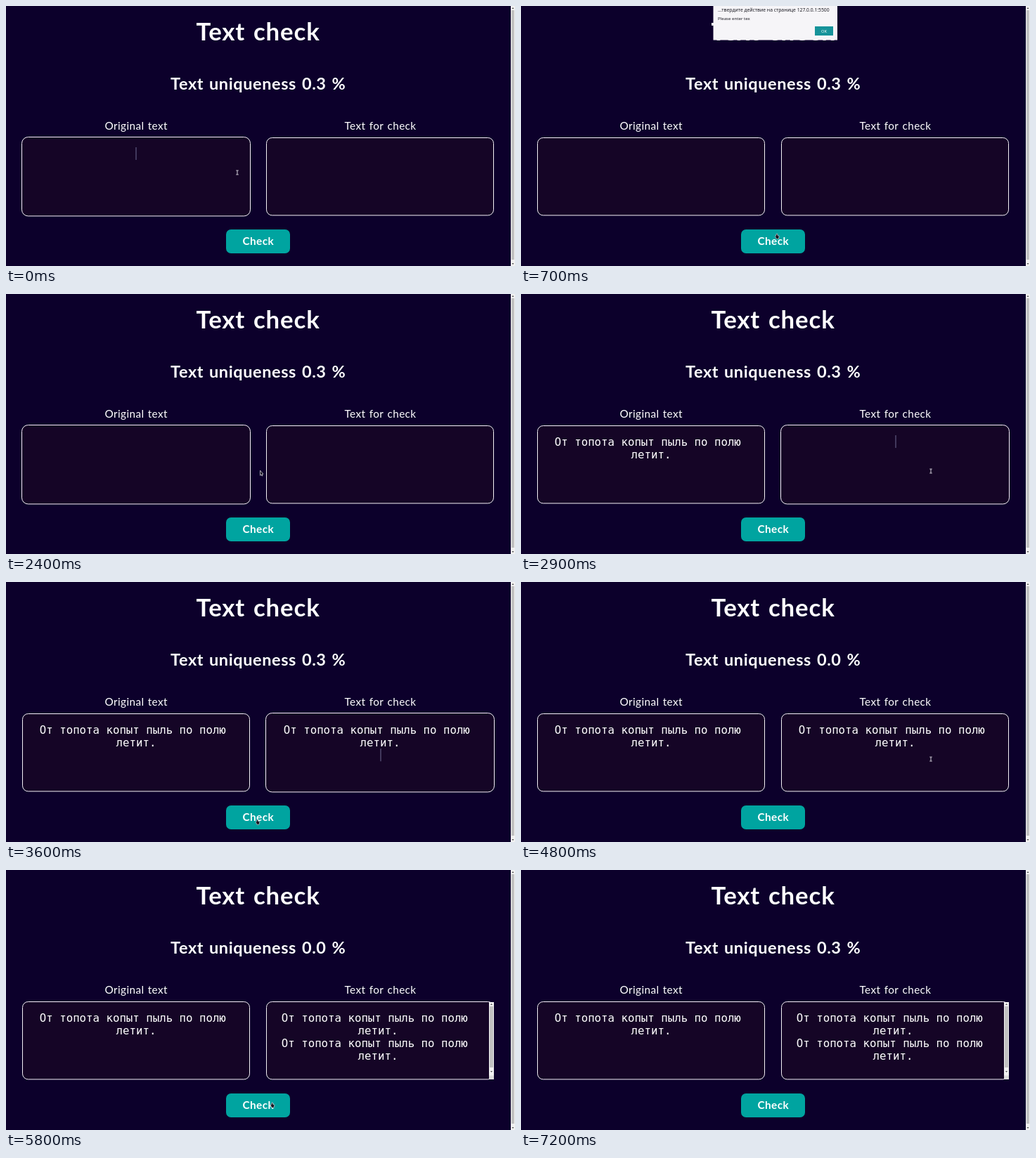
Write an HTML page with a canvas that moves like this. It is 724x370 px and loops after 7.4 s.

```html
<!DOCTYPE html>
<html lang="en">
<head>
<meta charset="utf-8">
<title>Text check</title>
<style>
  html, body { margin: 0; width: 724px; height: 370px; overflow: hidden; background: #0c002b; }
  canvas { display: block; }
</style>
</head>
<body>
<canvas id="stage" width="724" height="370"></canvas>
<script>
const ctx = document.getElementById('stage').getContext('2d');
const LOOP = 7400, STEP = 100;
const SANS = 'Lato, "Open Sans", sans-serif';
const MONO = '"DejaVu Sans Mono", monospace';
const UI = '"Noto Sans", sans-serif';
const CHAR = 9.46, LINE = 18.1;
const PHRASE = ['От топота копыт пыль по полю ', 'летит.'];

// Moments of the story
const CLICK = 400, ALERT = 600, CLOSE = 1500, FOCUS_L = 1900, PASTE_L = 2500,
  FOCUS_R = 2700, PASTE_R = 3200, CHECK_1 = 3700, REFOCUS = 5000, PASTE_2 = 5100, CHECK_2 = 5800;

const start = { x: 329, y: 237 }, button = { x: 358, y: 341 }, edge = { x: 379, y: 334 },
  score = { x: 472, y: 92 }, under = { x: 333, y: 131 }, left = { x: 228, y: 224 },
  gap = { x: 363, y: 255 }, right = { x: 583, y: 252 }, out = { x: -20, y: 206 };

// Mouse moves: begin, end, destination
const MOVES = [
  [100, CLICK, button], [ALERT, 1300, score], [1300, 1500, under], [1500, FOCUS_L, left],
  [2000, 2400, gap], [2400, 2900, right], [3200, 3500, button], [3800, 4400, score],
  [4500, 4800, right], [5200, 5700, edge], [5900, 6400, score], [6500, 7200, out]
];

function during(t, from, to) {
  return t >= from && t < to;
}

function rect(x, y, w, h, fill) {
  ctx.fillStyle = fill;
  ctx.fillRect(x, y, w, h);
}

function round(x, y, w, h, r, fill, line) {
  ctx.beginPath();
  ctx.roundRect(x, y, w, h, r);
  ctx.fillStyle = fill;
  ctx.fill();
  if (line) {
    ctx.strokeStyle = line;
    ctx.lineWidth = 1;
    ctx.stroke();
  }
}

function text(str, x, y, font, align = 'center', fill = '#fff') {
  ctx.font = font;
  ctx.textAlign = align;
  ctx.fillStyle = fill;
  ctx.fillText(str, x, y);
}

// Page lettering, set a little loose
function label(str, x, y, size, weight = 'normal') {
  ctx.letterSpacing = size * 0.025 + 'px';
  ctx.wordSpacing = size * 0.07 + 'px';
  text(str, x, y, `${weight} ${size}px ${SANS}`);
  ctx.letterSpacing = ctx.wordSpacing = '0px';
}

function poly(points, fill, line) {
  ctx.beginPath();
  for (const [x, y] of points) ctx.lineTo(x, y);
  ctx.closePath();
  ctx.fillStyle = fill;
  ctx.fill();
  if (line) {
    ctx.strokeStyle = line;
    ctx.lineWidth = 0.8;
    ctx.stroke();
  }
}

function bar(x, y, w, h, thumbTop, thumbEnd) {
  const mid = x + w / 2;
  rect(x, y, w, h, '#f1f1f1');
  rect(x + 1, thumbTop, w - 2, thumbEnd - thumbTop, '#c1c1c1');
  for (const [at, dir] of [[thumbTop - 3, -1], [thumbEnd + 6, 1]]) {
    poly([[mid - 1.5, at - dir], [mid + 1.5, at - dir], [mid, at + dir]], '#505050');
  }
}

function area(x, focus) {
  const grow = focus ? 1 : 0;
  round(x - grow, 187.5 - grow, 323 + 2 * grow, 110.4 + 2 * grow, 8 + grow, '#150526', '#f4f2f6');
}

// Centred lines; a trailing blank takes part in the centring
function phrase(cx, row) {
  PHRASE.forEach((str, i) =>
    text(str, cx - str.length * CHAR / 2, 215.7 + (row + i) * LINE, '15.72px ' + MONO, 'left'));
}

function caret(t, from, to, x, row) {
  const lit = Math.floor((t - from) / 500) % 2 === 0;
  if (during(t, from, to) && lit) rect(x, 201 + row * LINE, 1, 18, '#6f6c92');
}

function dialog(alpha) {
  ctx.globalAlpha = alpha;
  ctx.beginPath();
  ctx.rect(273.5, 0, 176.5, 48.5);
  ctx.rect(418, 29, 26, 13);
  ctx.fillStyle = '#f6f5f8';
  ctx.fill('evenodd');
  rect(418, 29, 26, 13, '#16939a');
  text('…твердите действие на странице 127.0.0.1:5500', 280, 8.3, '6.77px ' + UI, 'left', '#1c1c24');
  text('Please enter tex', 280, 20.4, '6.1px ' + UI, 'left', '#1c1c24');
  text('OK', 431, 37.6, '5.8px ' + UI);
  ctx.globalAlpha = 1;
}

function mouseAt(t) {
  let { x, y } = start;
  for (const [from, to, goal] of MOVES) {
    const k = Math.max(0, Math.min(1, (t - from) / (to - from)));
    const ease = k * k * (3 - 2 * k);
    x += (goal.x - x) * ease;
    y += (goal.y - y) * ease;
  }
  return [x, y];
}

function mouse(x, y) {
  const within = (l, top, r, b) => x > l && x < r && y > top && y < b;
  const beam = within(23, 187, 347, 298) || within(370, 187, 687, 298) ||
    within(0, 95, 718, 136) || within(0, 160, 718, 182);
  ctx.save();
  ctx.translate(x, y);
  if (beam) {
    rect(-0.5, -3, 1, 6, '#d4d1da');
    rect(-1.8, -3.4, 3.6, 0.9, '#d4d1da');
    rect(-1.8, 2.5, 3.6, 0.9, '#d4d1da');
  } else if (within(313, 318, 404, 352)) {
    poly([[-0.8, -3], [0.5, -3], [0.7, -0.6], [3, 0.1], [2, 4.2], [-1, 4.2], [-2.6, 1.2]],
      '#16131f', '#b9c9cc');
  } else {
    poly([[-1.5, -4], [-1.5, 3.2], [0, 1.9], [1, 4], [2, 3.5], [1.1, 1.5], [2.9, 1.2]],
      '#17131f', '#c9c6d0');
  }
  ctx.restore();
}

function draw(t) {
  const doubled = t >= PASTE_2;
  const rightX = doubled ? 529 : 532;
  const same = during(t, CHECK_1 + STEP, CHECK_2 + STEP);

  rect(0, 0, 724, 370, '#0c002b');
  label('Text check', 358.6, 49.4, 34.8, 'bold');
  label(`Text uniqueness ${same ? '0.0' : '0.3'} %`, 358.7, 118.7, 23.5, 'bold');
  label('Original text', 185.2, 175.7, 15.3);
  label('Text for check', 532.5, 175.7, 15.3);

  area(23.5, t < CLICK || during(t, FOCUS_L, FOCUS_R));
  area(370.5, during(t, FOCUS_R, CHECK_1) || during(t, REFOCUS, CHECK_2));
  if (t >= PASTE_L) phrase(185, 0);
  if (t >= PASTE_R) phrase(rightX, 0);
  if (doubled) {
    phrase(rightX, 2);
    bar(687, 188, 7, 110, 194, 281);
    rect(687, 292.5, 7, 5.5, '#dcdcdc');
  }

  caret(t, 0, CLICK, 184.5, 0);
  caret(t, FOCUS_L, PASTE_L, 184.5, 0);
  caret(t, PASTE_L, FOCUS_R, 184.5, 2);
  caret(t, FOCUS_R, PASTE_R, 532.5, 0);
  caret(t, PASTE_R, CHECK_1, 532.5, 2);
  caret(t, REFOCUS, PASTE_2, 532.5, 2);
  caret(t, PASTE_2, CHECK_2, 529.5, 4);

  round(313, 318, 91, 34, 7, '#00a4a0');
  label('Check', 358.8, 340.4, 15.3, 'bold');
  bar(718, 0, 6, 370, 6, 361);

  if (during(t, ALERT, CLOSE + STEP)) dialog(t === ALERT ? 0.6 : t < CLOSE ? 1 : 0.8);
  mouse(...mouseAt(t));
}

function frame(now) {
  draw(Math.floor((now % LOOP) / STEP) * STEP);
  requestAnimationFrame(frame);
}

draw(0);
requestAnimationFrame(frame);
</script>
</body>
</html>
```
